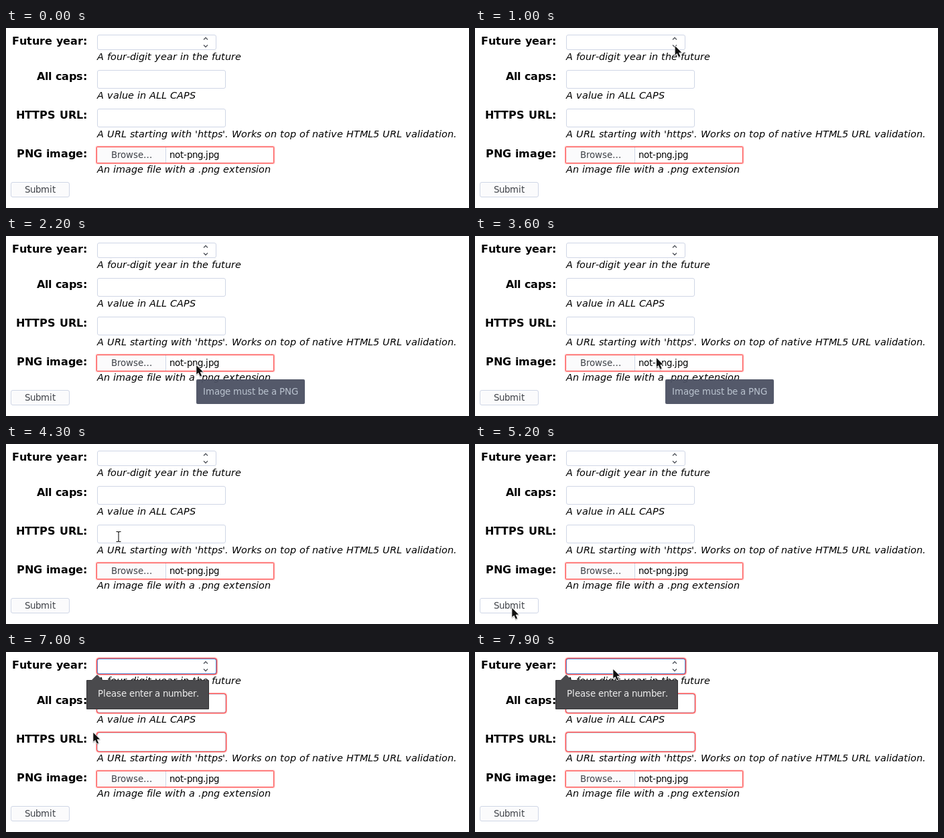
An HTML page that plays this animation: 691x270 px, repeating every 8000 ms.

```html
<!DOCTYPE html>
<html lang="en">
<head>
<meta charset="utf-8">
<title>Form validation</title>
<style>
  html, body { margin: 0; width: 691px; height: 270px; overflow: hidden; background: #fff; }
  body { position: relative; }
  .box {
    position: absolute; box-sizing: border-box; left: 136px; width: 192px; height: 28px;
    border: 1px solid #cfd6e6; border-radius: 3px; background: #fff;
  }
  #year { top: 10px; width: 178px; height: 23px; }
  #caps { top: 63px; }
  #link { top: 121px; }
  #file { top: 179px; width: 263px; height: 23px; border: 0; border-radius: 0; }
  #browse { top: 179px; width: 103px; height: 23px; border-width: 0 1px 0 0; border-radius: 0; background: #fbfbfc; }
  #send { left: 7px; top: 231px; width: 88px; height: 23px; background: #fbfbfc; }
  .bad { box-shadow: 0 0 2px 1px red; }
  #year.focus { border-color: #5294e2; }
  #send.hover { background: #fff; }
  #send.down { background: #5294e2; border-color: #5294e2; }
  svg { position: absolute; left: 0; top: 0; }
  text { font: 13.333px "DejaVu Sans", sans-serif; white-space: pre; }
  .label { font-size: 16px; font-weight: bold; }
  .hint { font-size: 14.4px; font-style: italic; }
  .ui { fill: #3f4248; }
  .line { fill: none; stroke: #50545c; stroke-width: 1.3; }
</style>
</head>
<body>
<div class="box" id="year"></div>
<div class="box" id="caps"></div>
<div class="box" id="link"></div>
<div class="box bad" id="file"></div>
<div class="box" id="browse"></div>
<div class="box" id="send"></div>

<svg width="691" height="270" viewBox="0 0 691 270">
  <text class="label" x="121" y="25">Future year:</text>
  <text class="label" x="121" y="78">All caps:</text>
  <text class="label" x="121" y="136">HTTPS URL:</text>
  <text class="label" x="121" y="194">PNG image:</text>
  <text class="hint" x="136" y="48">A four-digit year in the future</text>
  <text class="hint" x="136" y="106">A value in ALL CAPS</text>
  <text class="hint" x="136" y="164">A URL starting with 'https'. Works on top of native HTML5 URL validation.</text>
  <text class="hint" x="136" y="217">An image file with a .png extension</text>
  <path class="line" d="M295 17.5 l3 -3 l3 3 M295 25.5 l3 3 l3 -3"/>
  <text class="ui" x="157" y="195">Browse…</text>
  <text x="244" y="195">not-png.jpg</text>
  <text class="ui" id="sendText" x="28" y="247">Submit</text>
  <rect id="caret" x="145" y="13" width="1" height="17"/>

  <g id="tip">
    <rect x="284" y="215" width="162" height="37" rx="2" fill="#4b5162" fill-opacity=".95"/>
    <text x="294" y="238" fill="#bac3cf">Image must be a PNG</text>
  </g>

  <g id="popup">
    <path d="M120.5 42.5 H128 L136 34.5 L144 42.5 H302.5 V85.5 H120.5 Z" fill="#4a4a4d" stroke="#333336"/>
    <text x="137" y="67" fill="#eee">Please enter a number.</text>
  </g>

  <g id="pointer">
    <path id="arrow" d="M.3 1 V14.6 L3.3 11.9 L5.8 17.5 L8.1 16.4 L5.7 11 L10 10.7 Z"
      fill="#111" stroke="#fff" stroke-width="1.6" paint-order="stroke" stroke-linejoin="round"
      style="filter:drop-shadow(.5px 1px .7px rgba(0,0,0,.3))"/>
    <g id="beam" fill="none">
      <path d="M-3.5 -7.5 H3.5 M-3.5 7.5 H3.5 M0 -7.5 V7.5" stroke="#fff" stroke-width="2.6"/>
      <path d="M-3.5 -7.5 H-1 L0 -6.5 L1 -7.5 H3.5 M-3.5 7.5 H-1 L0 6.5 L1 7.5 H3.5 M0 -7 V7" stroke="#111" stroke-width="1.1"/>
    </g>
  </g>
</svg>

<script>
  const LOOP = 8000, STEP = 100;
  const $ = id => document.getElementById(id);

  // Whole-pixel letter spacing, as in hinted desktop text; labels align right.
  const pen = document.createElement("canvas").getContext("2d");
  for (const el of document.querySelectorAll("text")) {
    const css = getComputedStyle(el);
    pen.font = `${css.fontStyle} ${css.fontWeight} ${css.fontSize} ${css.fontFamily}`;
    const widths = [...el.textContent].map(c => Math.round(pen.measureText(c).width));
    const total = widths.reduce((a, b) => a + b);
    let x = +el.getAttribute("x") - (el.matches(".label") ? total : 0);
    el.setAttribute("x", widths.map(w => (x += w) - w).join(" "));
  }

  // Pointer strokes: smooth curves through a few evenly timed points
  const strokes = [
    { from: 400, to: 600, via: [[226, -16], [243, -15], [240, -40]] },
    { from: 800, to: 1600, via: [[240, -12], [320, 45], [397, 150], [284, 193]] },
    { from: 3500, to: 4300, via: [[284, 193], [240, 158], [199, 133], [168, 139]] },
    { from: 4300, to: 4600, via: [[168, 139], [140.5, 149], [92, 198], [55, 235]] },
    { from: 4800, to: 5200, via: [[55, 235], [55, 245]] },
    { from: 6600, to: 7400, via: [[55, 245], [130, 120], [226, 11]] },
    { from: 7700, to: 7900, via: [[226, 11], [206, 25]] }
  ];

  function spline(a, b, c, d, u) {
    return b + u / 2 * (c - a + u * (2 * a - 5 * b + 4 * c - d + u * (3 * (b - c) + d - a)));
  }

  function pointerAt(t) {
    const stroke = strokes.filter(s => s.from <= t).pop();
    if (!stroke) return [0, -40];
    const { from, to, via } = stroke, last = via.length - 1;
    const k = Math.min(1, (t - from) / (to - from)) * last;
    const i = Math.min(last - 1, Math.floor(k));
    const at = n => via[Math.max(0, Math.min(last, n))];
    return [0, 1].map(axis =>
      spline(at(i - 1)[axis], at(i)[axis], at(i + 1)[axis], at(i + 2)[axis], k - i));
  }

  const show = (id, on) => $(id).setAttribute("visibility", on ? "visible" : "hidden");

  function draw(now) {
    const t = Math.floor((now % LOOP) / STEP) * STEP;
    const within = (a, b) => t >= a && t < b;
    const sent = t >= 6000, pressed = within(5900, 6000), typing = within(3800, 4500);

    $("pointer").setAttribute("transform", `translate(${pointerAt(t)})`);
    show("arrow", !typing);
    show("beam", typing);
    show("tip", within(2200, 3700));
    show("popup", sent);
    show("caret", within(6000, 6700));
    for (const id of ["year", "caps", "link"]) $(id).classList.toggle("bad", sent);
    $("year").classList.toggle("focus", sent);
    $("send").classList.toggle("hover", within(4600, 6800));
    $("send").classList.toggle("down", pressed);
    $("sendText").style.fill = pressed ? "#fff" : "";
  }

  const start = performance.now();
  function tick() {
    draw(performance.now() - start);
    requestAnimationFrame(tick);
  }
  tick();
</script>
</body>
</html>
```
